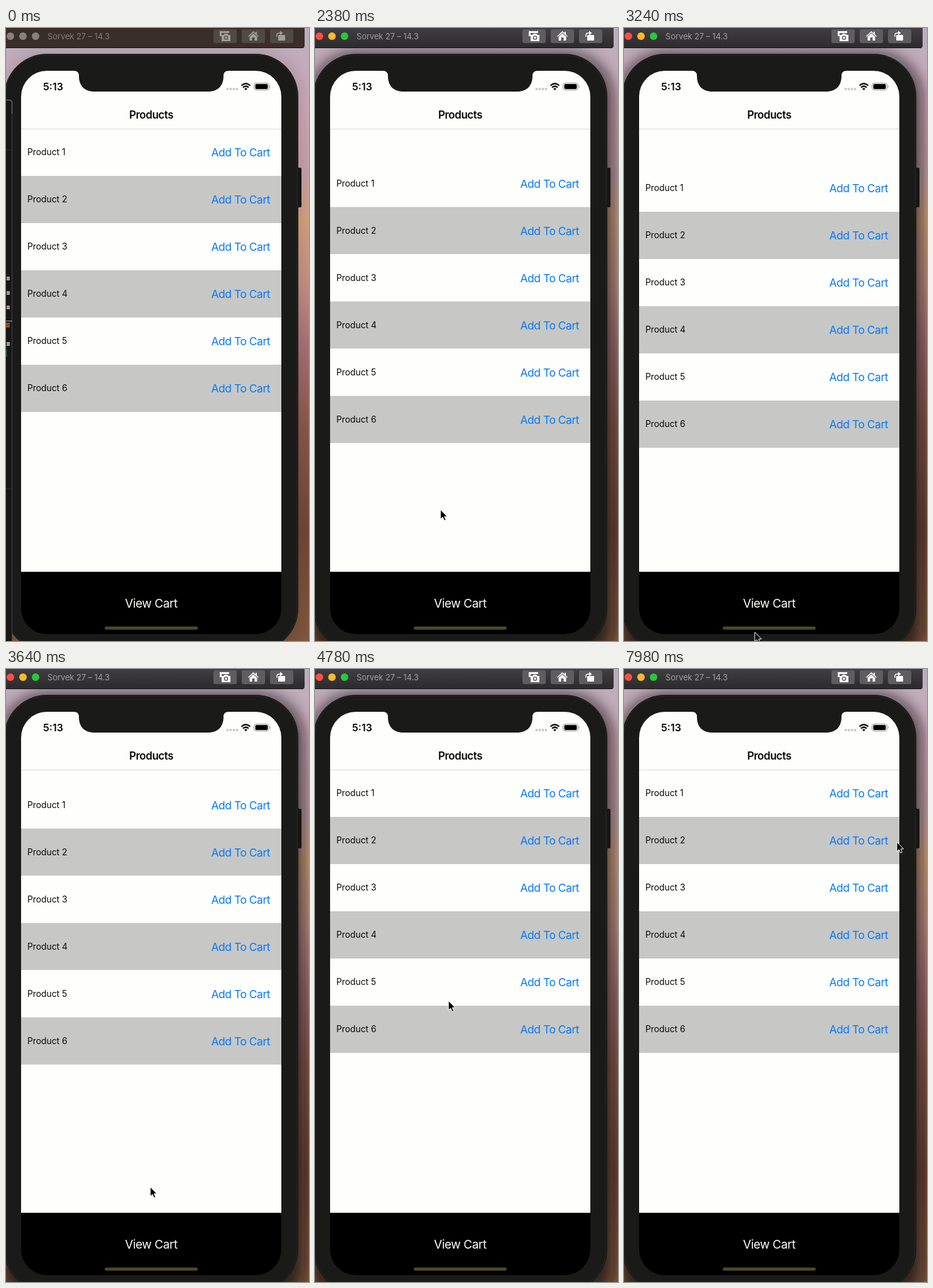
An HTML page that plays this animation: 482x974 px, repeating every 8000 ms.

```html
<!DOCTYPE html>
<html lang="en">
<head>
<meta charset="utf-8">
<title>Product list</title>
<style>
  html, body { margin: 0; width: 100%; height: 100%; overflow: hidden; background: #1a1a19; }
  svg { display: block; width: 482px; height: 974px; font-family: Inter, "Open Sans", sans-serif; }
  .name { font-size: 13.8px; fill: #080808; }
  .add { font-size: 17.5px; letter-spacing: -.5px; fill: #067af6; text-anchor: end; }
  .strong { font-weight: 600; fill: #080808; }
  .tools { fill: #5f5d5f; --icon: #fafafa; }
  .inactive .tools { fill: #504a42; --icon: #a39e98; }
  .icon { fill: var(--icon); stroke: none; }
  .bar { fill: url(#barOn); }
  .inactive .bar { fill: #3a2e2a; }
  .title { font-size: 13px; letter-spacing: -.1px; fill: #a09ea2; }
  .inactive .title { fill: #837b76; }
  .inactive .light { fill: #87807c; }
  .behind { display: none; }
  .inactive .behind { display: inline; }
  .shade { opacity: .7; }
  .inactive .shade { opacity: .15; }
</style>
</head>
<body>
<svg id="stage" viewBox="0 0 482 974">
  <defs>
    <linearGradient id="sky" x2="0" y2="1">
      <stop offset="0" stop-color="#b8aebc"/>
      <stop offset=".12" stop-color="#d2abba"/>
      <stop offset=".24" stop-color="#cba5ac"/>
      <stop offset=".31" stop-color="#d9a583"/>
      <stop offset=".42" stop-color="#c99388"/>
      <stop offset=".52" stop-color="#ac7478"/>
      <stop offset=".65" stop-color="#8d5b4c"/>
      <stop offset=".82" stop-color="#754838"/>
      <stop offset="1" stop-color="#865a40"/>
    </linearGradient>
    <linearGradient id="barOn" x2="0" y2="1">
      <stop offset="0" stop-color="#413e42"/>
      <stop offset="1" stop-color="#2d2a2c"/>
    </linearGradient>
    <filter id="blur" x="-20%" y="-20%" width="140%" height="140%"><feGaussianBlur stdDeviation="12"/></filter>
    <clipPath id="screen"><rect x="24" y="68" width="414" height="895" rx="41"/></clipPath>
    <clipPath id="viewport"><rect x="24" y="161" width="414" height="703"/></clipPath>
  </defs>

  <rect width="482" height="974" fill="url(#sky)"/>
  <rect class="shade" x="-8" y="40" width="482" height="980" rx="72" fill="#100b0c" filter="url(#blur)"/>

  <!-- Simulator toolbar -->
  <path class="bar" d="M0 0H475V28Q475 32 471 32H0Z"/>
  <path d="M0 31.5H473" stroke="#151314"/>
  <circle class="light" cx="7" cy="13" r="6" fill="#ff4f45"/>
  <circle class="light" cx="27" cy="13" r="6" fill="#fcba28"/>
  <circle class="light" cx="47" cy="13" r="6" fill="#28c73c"/>
  <text class="title" x="66" y="18">Sorvek 27 – 14.3</text>
  <g class="tools">
    <rect x="330" y="2" width="37" height="22" rx="3"/>
    <rect x="375" y="2" width="37" height="22" rx="3"/>
    <rect x="420" y="2" width="37" height="22" rx="3"/>
    <path class="icon" d="M340 13V5H355V8H343V13ZM343 11H346L348 9H352L354 11H357V21H343Z"/>
    <circle cx="350" cy="15.5" r="2.6" fill="none" stroke="#4f4d4f" stroke-width="1.3"/>
    <path class="icon" d="M385 13L393.500 5L397 8.300V6H399V10.200L402 13L401 14L393.500 7.200L386 14ZM387.500 14L393.500 8.500L399.500 14V20H395.500V15H391.500V20H387.500Z"/>
    <rect class="icon" x="433" y="11" width="11" height="9" rx="1"/>
    <path d="M431 14V11Q431 8 435 8H438" fill="none" stroke="var(--icon)" stroke-width="1.5"/>
    <path class="icon" d="M436 4.500L440.500 8L436 11.500Z"/>
  </g>

  <!-- Phone -->
  <rect x="461" y="222" width="9" height="63" rx="2" fill="#171616"/>
  <rect x="-3" y="41" width="468" height="949" rx="68" fill="#1a1a19"/>
  <rect x="-1" y="43" width="464" height="945" rx="66" fill="none" stroke="#272726"/>
  <g class="behind">
    <path d="M0 114H6Q10 114 10 118V974H0Z" fill="#171716"/>
    <path d="M0 114.500H6Q9.500 114.500 9.500 118V974" fill="none" stroke="#454340"/>
    <path d="M0 114.500H6Q9.500 114.500 9.500 118V136" fill="none" stroke="#85827e"/>
    <path d="M0 193.500H9M0 732.500H9" stroke="#353432"/>
    <path d="M0 465.500H10" stroke="#a8a5a2"/>
    <path d="M1 395h5v6h-5zM1 418h5v6h-5zM1 441h5v6h-5zM1 499h5v6h-5z" fill="#a8949a"/>
    <path d="M0 468h6v8h-6z" fill="#805024"/>
    <path d="M0 510h2v12h-2z" fill="#0a4a30"/>
  </g>

  <g clip-path="url(#screen)">
    <rect x="24" y="68" width="414" height="796" fill="#fefefc"/>
    <g clip-path="url(#viewport)"><g id="list"></g></g>
    <path d="M24 160.500H438" stroke="#dfdfd6"/>
    <rect x="24" y="864" width="414" height="110" fill="#000"/>
    <rect x="157" y="951" width="148" height="5" rx="2.500" fill="#4d4826"/>
    <path d="M108 67V68Q116 68 116 76C116 91 124 101 141 101H321C338 101 346 91 346 76Q346 68 354 68V67Z" fill="#1a1a19"/>
  </g>
  <text class="strong" x="59" y="99" font-size="16">5:13</text>
  <text class="strong" x="231" y="144" font-size="17" letter-spacing="-.45" text-anchor="middle">Products</text>
  <text x="231" y="921" font-size="19" letter-spacing="-.45" text-anchor="middle" fill="#fdfdfa">View Cart</text>

  <path d="M352.500 97H370" stroke="#c8c8c6" stroke-width="4" stroke-linecap="round" stroke-dasharray="0 5"/>
  <g fill="none" stroke="#080808" stroke-width="2.300">
    <path d="M374.500 91.500Q381.500 85 388.500 91.500M377 94.500Q381.500 90.500 386 94.500"/>
    <path d="M379 96.500Q381.500 94.300 384 96.500L381.500 99Z" fill="#080808" stroke="none"/>
  </g>
  <rect x="394.500" y="87.500" width="24" height="11" rx="3.500" fill="none" stroke="#8f8f8c"/>
  <rect x="396.500" y="89" width="20" height="8" rx="2" fill="#000"/>
  <path d="M420 91Q422 93 420 95Z" fill="#8f8f8c"/>

  <path id="cursor" d="M0 0V15L3.500 11.800L6 17.300L8.500 16.200L6.100 10.900H10.700Z" fill="#000" stroke="#fefefc" stroke-width="1"/>
</svg>
<script>
  const LOOP = 8000, ACTIVATE = 2150, RELEASE = 2810, CURSOR_IN = 1150;
  const DRAG_Y = 669, VIEW_HEIGHT = 703, ROW_HEIGHT = 75;
  // Pointer stops: time, x, y
  const stops = [
    [CURSOR_IN, 490, 420], [1940, 190, 653], [ACTIVATE, 190, 657], [2680, 214, 925],
    [RELEASE, 214, 925], [3240, 208, 960], [4080, 254, 666], [6000, 116, 207], [LOOP - 20, 434, 275]
  ];
  const stage = document.getElementById('stage');
  const list = document.getElementById('list');
  const cursor = document.getElementById('cursor');

  list.innerHTML = Array.from({ length: 6 }, (_, i) => {
    const y = 160 + i * ROW_HEIGHT;
    return `<rect x="24" y="${y}" width="414" height="${ROW_HEIGHT}" fill="${i % 2 ? '#c7c7c6' : '#fefefc'}"/>
      <text class="name" x="34" y="${y + 42}">Product ${i + 1}</text>
      <text class="add" x="420" y="${y + 44}">Add To Cart</text>`;
  }).join('');

  function pointer(t) {
    const next = stops.findIndex(stop => stop[0] > t);
    if (next === 0) return stops[0].slice(1);
    if (next < 0) return stops[stops.length - 1].slice(1);
    const [t0, x0, y0] = stops[next - 1], [t1, x1, y1] = stops[next];
    const p = (t - t0) / (t1 - t0), ease = p * p * (3 - 2 * p);
    return [x0 + (x1 - x0) * ease, y0 + (y1 - y0) * ease];
  }

  function rubberBand(y) {
    const pull = Math.max(0, y - DRAG_Y) * .55 / VIEW_HEIGHT;
    return VIEW_HEIGHT * pull / (1 + pull);
  }

  function listOffset(t) {
    if (t < ACTIVATE) return 0;
    if (t < RELEASE) return rubberBand(pointer(t)[1]);
    const u = (t - RELEASE) * .004;
    const offset = rubberBand(pointer(RELEASE)[1]) * (1 + u) * Math.exp(-u);
    return offset < .4 ? 0 : offset;
  }

  function draw(now) {
    const t = now % LOOP, [x, y] = pointer(t);
    stage.classList.toggle('inactive', t < ACTIVATE);
    list.setAttribute('transform', `translate(0 ${Math.round(listOffset(t) * 2) / 2})`);
    cursor.setAttribute('transform', `translate(${x} ${y})`);
    cursor.style.display = t < CURSOR_IN ? 'none' : '';
    requestAnimationFrame(draw);
  }
  draw(0);
</script>
</body>
</html>
```
